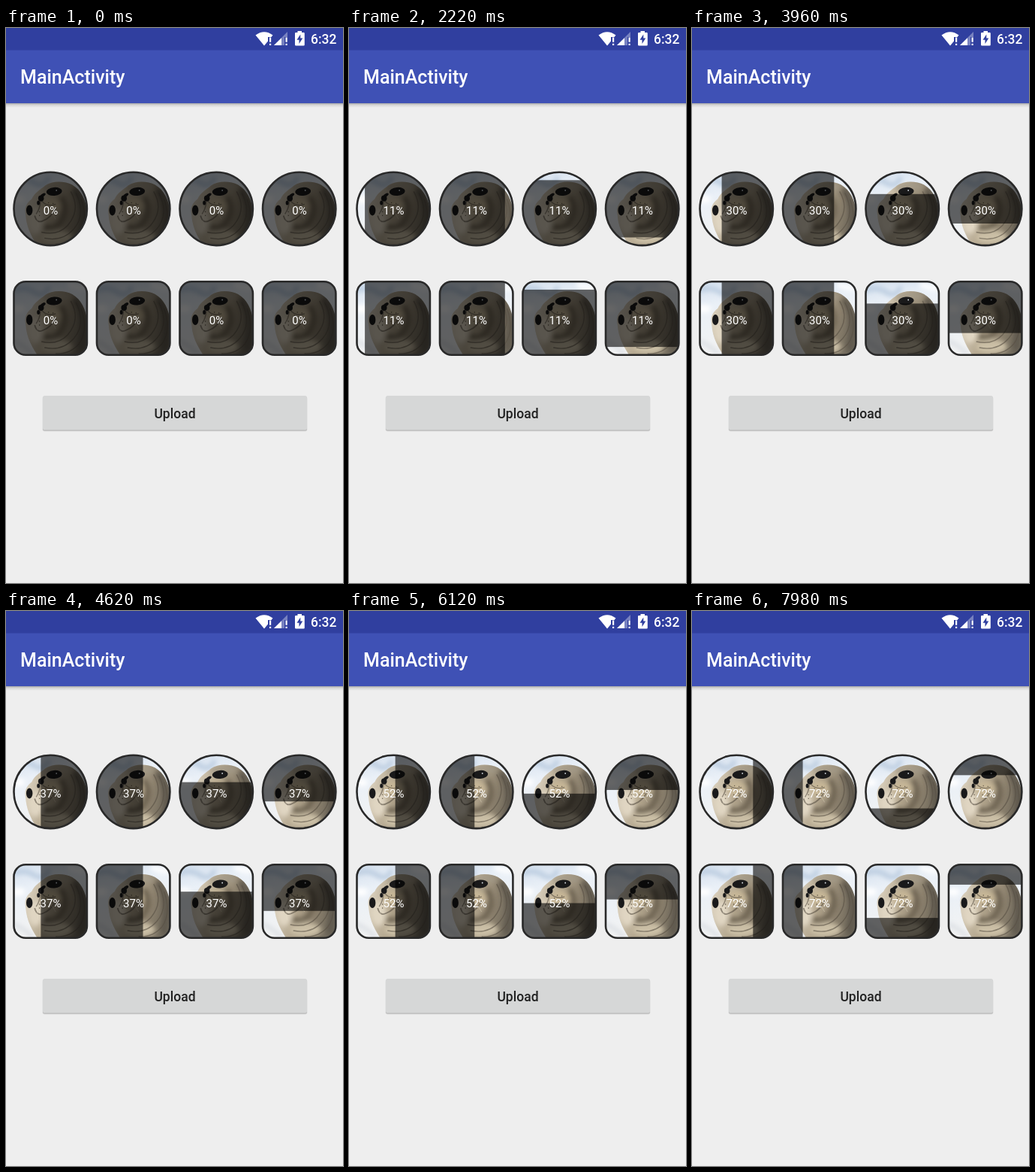
These frames come from a looping animation (449x738 px, 8000 ms). An HTML page:

```html
<!DOCTYPE html>
<html lang="en">
<head>
<meta charset="utf-8">
<title>Upload progress</title>
<style>
html, body { margin: 0; width: 100%; height: 100%; overflow: hidden; background: #eee; }
svg { display: block; width: 449px; height: 738px; font-family: Roboto, sans-serif; }
.bold { font-weight: 500; }
.label { font-size: 15px; fill: #fff; text-anchor: middle; }
</style>
</head>
<body>
<svg viewBox="0 0 449 738">
  <defs>
    <linearGradient id="drop" x2="0" y2="1">
      <stop stop-color="#000" stop-opacity=".3"/>
      <stop offset=".4" stop-color="#000" stop-opacity=".1"/>
      <stop offset="1" stop-color="#000" stop-opacity="0"/>
    </linearGradient>
    <linearGradient id="sky" x2=".25" y2="1">
      <stop stop-color="#d3dfed"/>
      <stop offset=".35" stop-color="#eaf0f7"/>
      <stop offset="1" stop-color="#f3f3f2"/>
    </linearGradient>
    <linearGradient id="fur" x1=".05" y1=".4" x2=".95" y2=".6">
      <stop stop-color="#d6ccb9"/>
      <stop offset=".35" stop-color="#b3a68e"/>
      <stop offset=".7" stop-color="#8b806d"/>
      <stop offset="1" stop-color="#6c6659"/>
    </linearGradient>
    <filter id="soft" x="-40%" y="-40%" width="180%" height="180%"><feGaussianBlur stdDeviation="3"/></filter>
    <filter id="fine" x="-20%" y="-20%" width="140%" height="140%"><feGaussianBlur stdDeviation=".6"/></filter>
    <clipPath id="round"><circle cx="50" cy="50" r="49"/></clipPath>
    <clipPath id="square"><rect x="1" y="1" width="98" height="98" rx="16"/></clipPath>
    <clipPath id="body"><path id="shape" d="M17 58C15 49 18 42 25 37C29 28 36 25 43 19C53 12 69 13 79 18C91 25 97 38 99 53L101 101H34C27 91 18 76 17 58Z"/></clipPath>
    <g id="photo">
      <rect width="100" height="100" fill="url(#sky)"/>
      <g filter="url(#soft)">
        <path d="M0 14Q14 6 28 15T48 8" fill="none" stroke="#b9cbdf" stroke-width="6"/>
        <path d="M74 4Q88 12 100 8" fill="none" stroke="#fff" stroke-width="7"/>
        <path d="M0 40Q7 34 14 40" fill="none" stroke="#fff" stroke-width="9"/>
        <path d="M0 80Q12 84 27 98" fill="none" stroke="#d9dde2" stroke-width="5"/>
      </g>
      <use href="#shape" fill="url(#fur)" filter="url(#fine)"/>
      <g clip-path="url(#body)">
        <g filter="url(#soft)">
          <ellipse cx="30" cy="66" rx="10" ry="17" fill="#e0d6c2"/>
          <ellipse cx="58" cy="88" rx="21" ry="10" fill="#cbbfa6"/>
          <ellipse cx="50" cy="46" rx="13" ry="10" fill="#c7b797"/>
          <path d="M64 34Q77 54 60 72Q50 79 41 73" fill="none" stroke="#6b604f" stroke-width="7"/>
          <path d="M82 24Q101 48 90 92" fill="none" stroke="#5e584d" stroke-width="9"/>
          <path d="M42 23Q57 16 76 22" fill="none" stroke="#a29a89" stroke-width="6"/>
        </g>
        <g fill="none" stroke="#574f43" stroke-opacity=".6" filter="url(#fine)">
          <path d="M77 27Q91 51 73 72Q60 86 38 81" stroke-width="1.5"/>
          <path d="M84 29Q98 57 81 77Q66 94 42 89" stroke-width="1.3"/>
          <path d="M91 37Q101 66 88 84Q76 98 57 97" stroke-width="1.3"/>
          <path d="M37 39Q36 50 31 57M38 39Q45 48 57 44" stroke-width="1.4"/>
          <path d="M29 59Q32 70 40 66Q51 62 57 49" stroke-width="1.8"/>
        </g>
      </g>
      <g fill="#19191a" filter="url(#fine)">
        <ellipse cx="55" cy="27" rx="10.5" ry="5.5" transform="rotate(-5 55 27)"/>
        <ellipse cx="22" cy="52" rx="4.2" ry="7"/>
        <ellipse cx="37.5" cy="36" rx="3.8" ry="4"/>
        <ellipse cx="34" cy="42" rx="2" ry="3"/>
        <ellipse cx="40" cy="32" rx="4" ry="2" transform="rotate(-35 40 32)"/>
      </g>
      <circle cx="58" cy="25.5" r=".9" fill="#dce2e8"/>
      <path d="M43 46h1m3-4h1m1 6h1m3-5h1m-8 11h1m5-2h1m-18 2h1m-1 5h1" stroke="#544a3c" stroke-width="1.3"/>
      <path d="M45 46Q55 49 62 57M46 50Q53 55 57 64M33 54Q31 64 34 75" fill="none" stroke="#eee4ce" stroke-opacity=".5" stroke-width=".7"/>
    </g>
  </defs>

  <rect width="449" height="738" fill="#eee"/>
  <rect y="100" width="449" height="6" fill="url(#drop)"/>
  <rect y="29" width="449" height="71" fill="#3f51b5"/>
  <rect width="449" height="29.5" fill="#303f9f"/>

  <g fill="#fff">
    <path d="M332.5 9.5Q344 1 355.5 9.5L353.5 12H349V17.5L344 23.5Z"/>
    <path d="M351 12.5h2.2v6.2H351zM351 20.7h2.2v2.3H351z"/>
    <path d="M375 5V12H371V23H357Z" fill-opacity=".35"/>
    <path d="M367 13.3V23H357Z"/>
    <path d="M372.5 12.5h2.2v6.2h-2.2zM372.5 20.7h2.2v2.3h-2.2z"/>
    <path d="M388.5 4h5.5v2h2.5q1.3 0 1.3 1.3v14.9q0 1.3-1.3 1.3H386.300q-1.3 0-1.3-1.3V7.300q0-1.3 1.3-1.3h2.200z"/>
    <path d="M392.300 8.500L387.500 15.800H390.500V21L395.300 13.600H392.300Z" fill="#303f9f"/>
    <text class="bold" x="406" y="21" font-size="17.5">6:32</text>
    <text class="bold" x="19" y="74" font-size="25">MainActivity</text>
  </g>

  <g id="tiles"></g>

  <rect x="48.500" y="490" width="353" height="46.500" rx="3" fill="#000" fill-opacity=".07"/>
  <rect x="49" y="490" width="352" height="45.700" rx="2.500" fill="#000" fill-opacity=".16"/>
  <rect x="49" y="489" width="352" height="45.500" rx="2.500" fill="#d6d7d7"/>
  <text class="bold" x="225" y="518.500" font-size="17.5" text-anchor="middle" fill="#212121">Upload</text>
</svg>
<script>
const LOOP = 8000, STEP = 60, START = 1140;
// Upload progress: [time in ms, percent]
const PROGRESS = [[1080, 0], [1560, 4.95], [2940, 19.5], [3960, 30.4], [5340, 44.6], [6900, 60.3], [7980, 72.1]];

const outlines = {
  round: '<circle cx="50" cy="50" r="48.700"',
  square: '<rect x="1.300" y="1.300" width="97.400" height="97.400" rx="15.700"'
};

function tile(kind, col, y) {
  return `<g transform="translate(${9.2 + col * 110.5} ${y})">
    <g clip-path="url(#${kind})">
      <use href="#photo"/>
      <rect class="shade" width="100" height="100" fill="#000" fill-opacity=".6"/>
    </g>
    ${outlines[kind]} fill="none" stroke="#292929" stroke-width="2.600"/>
    <text class="label" x="50.300" y="58">0%</text>
  </g>`;
}

const row = (kind, y) => [0, 1, 2, 3].map(col => tile(kind, col, y)).join('');
document.getElementById('tiles').innerHTML = row('round', 190.4) + row('square', 336);
const shades = document.querySelectorAll('.shade');
const labels = document.querySelectorAll('.label');

function percentAt(time) {
  const t = Math.floor(time / STEP) * STEP;
  if (t < START) return 0;
  const i = PROGRESS.findIndex(key => key[0] >= t);
  const [t0, p0] = PROGRESS[i - 1], [t1, p1] = PROGRESS[i];
  return p0 + (p1 - p0) * (t - t0) / (t1 - t0);
}

// Columns uncover from the left, right, top and bottom.
function draw(time) {
  const p = percentAt(time);
  shades.forEach((shade, i) => {
    const side = i % 4, across = side < 2;
    shade.setAttribute(across ? 'width' : 'height', 100 - p);
    if (side % 2 === 0) shade.setAttribute(across ? 'x' : 'y', p);
  });
  labels.forEach(label => { label.textContent = Math.floor(p) + '%'; });
}

const origin = performance.now();
function tick() {
  draw((performance.now() - origin) % LOOP);
  requestAnimationFrame(tick);
}
draw(0);
requestAnimationFrame(tick);
</script>
</body>
</html>
```
